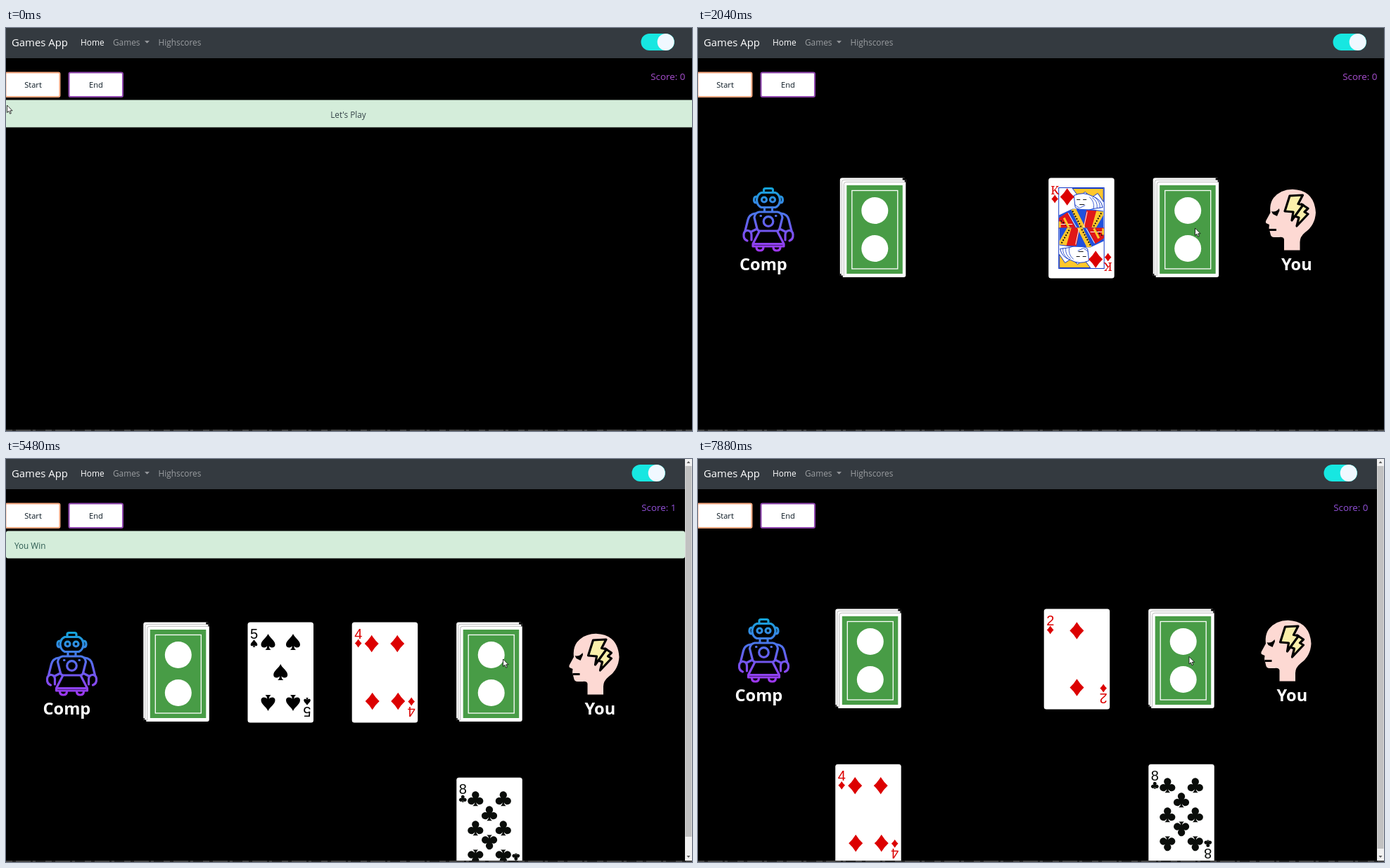
An HTML page that plays this animation: 975x574 px, repeating every 8 s.

```html
<!DOCTYPE html>
<html lang="en">
<head>
<meta charset="utf-8">
<title>Games App</title>
<style>
  html, body { margin: 0; width: 100%; height: 100%; overflow: hidden; background: #000; }
  svg { display: block; width: 975px; height: 574px; font-family: "Open Sans", "Noto Sans", sans-serif; }
  .nav { font-size: 11.85px; fill: #9a9da0; }
  .label { font-size: 23.6px; font-weight: 700; fill: #fff; }
  .msg { font-size: 11.75px; }
  .index { font: 20px "Liberation Sans", Arial, sans-serif; text-anchor: middle; }
  .index.face { font: 17px "Noto Serif", serif; }
</style>
</head>
<body>
<svg viewBox="0 0 975 574">
  <defs>
    <linearGradient id="robotInk" gradientUnits="userSpaceOnUse" x1="0" y1="227" x2="0" y2="319">
      <stop offset="0" stop-color="#12a5d8"/>
      <stop offset=".5" stop-color="#5a68ee"/>
      <stop offset="1" stop-color="#a035f0"/>
    </linearGradient>
    <path id="club" fill="#0a0d0a" d="M5.2-5.3A5.2 5.2 0 1 0-3.4-1.3A5.2 5.2 0 1 0-1 5.2Q-1.2 9-3.8 10.4H3.8Q1.2 9 1 5.2A5.2 5.2 0 1 0 3.4-1.3A5.2 5.2 0 0 0 5.2-5.3Z"/>
    <path id="spade" d="M0-11.5C2-6 10-2 10 4C10 9 4 9 1.2 6Q1.5 10 4 11.5H-4Q-1.5 10-1.2 6C-4 9-10 9-10 4C-10-2-2-6 0-11.5Z"/>
    <path id="diamond" fill="#dc0000" d="M0-12.3Q4.5-5 10 0Q4.5 5 0 12.3Q-4.5 5-10 0Q-4.5-5 0-12.3Z"/>
    <g id="deck">
      <rect width="93.5" height="141.5" rx="3" fill="#fff"/>
      <path d="M2.5 140V6Q2.5 2.8 6 2.8H92M5.5 140V9Q5.5 5.8 9 5.8H92" fill="none" stroke="#aaa" stroke-width=".8"/>
      <path d="M89 0H93.5V6H92V3H89ZM0 136.5H1.5V139H4V141.5H0Z"/>
      <rect x="9.5" y="10.5" width="79.5" height="126" fill="#489c46"/>
      <rect x="17" y="18" width="65" height="111.500" fill="none" stroke="#fff" stroke-width="1.3"/>
      <circle cx="49.500" cy="46.500" r="19" fill="#fff"/>
      <circle cx="49.500" cy="100.500" r="19" fill="#fff"/>
    </g>
    <g id="royalHalf">
      <path fill="#ffc72c" stroke="#1238c8" d="M34 15H78V34L70 22L61 28L52 20L43 27Z"/>
      <path fill="#fff" stroke="#1238c8" d="M36 25Q50 19 62 26Q75 30 77 42L63 44Q50 50 38 42Z"/>
      <path fill="none" stroke="#1238c8" stroke-width=".8" d="M62 28Q70 33 69 43M58 27Q66 34 64 44M66 28Q74 34 73 43M37 38L44 43L52 39"/>
      <path stroke="#111" d="M40 31H45M49 31H54M44 38H51"/>
      <path fill="#2050dc" d="M15 53L34 44L63 45L78 47V72H15Z"/>
      <path fill="#e01818" d="M15 57L27 49L39 72H15ZM54 46L71 47L61 72H49Z"/>
      <path fill="#ffc72c" d="M32 45L39 44L53 72H45ZM68 47L78 48V53L67 72H61Z"/>
      <path fill="none" stroke="#111" stroke-width="2" stroke-dasharray="2 2" d="M34 47L47 71M75 50L63 71M17 61L29 70"/>
      <path fill="none" stroke="#fff" d="M28 50L40 71M55 48L50 71M16 66H34"/>
      <path stroke="#ffc72c" stroke-width="3" d="M16 62V71M22 57L29 71"/>
    </g>
  </defs>

  <rect width="975" height="574"/>
  <rect width="975" height="43" fill="#343a40"/>
  <text x="8" y="26" font-size="14.9" fill="#fff">Games App</text>
  <g class="nav">
    <text x="106" y="25" fill="#fff">Home</text>
    <text x="152" y="25">Games</text>
    <path d="M197 18.200H204L200.500 21.700Z"/>
    <text x="216.500" y="25">Highscores</text>
  </g>
  <g id="corner">
    <rect x="902.500" y="8" width="47.500" height="24" rx="12" fill="#17e7e1"/>
    <circle cx="937.700" cy="20" r="12" fill="#f0f8ff"/>
    <text id="score" x="965.500" y="74" font-size="13.4" text-anchor="end"></text>
  </g>

  <rect data-on="1020-2040" x="-2" y="60.500" width="81" height="40" rx="4" fill="#0c2038"/>
  <rect id="start" x="-.5" y="63.500" width="77" height="34.500" rx="2" stroke="#f5a67e" stroke-width="2"/>
  <rect x="89.500" y="63.500" width="76.500" height="34.500" rx="2" fill="#fff" stroke="#8e44ad" stroke-width="2"/>
  <g font-size="11.1" text-anchor="middle">
    <text id="startText" x="38.500" y="85">Start</text>
    <text x="128" y="85" fill="#0c1a24">End</text>
  </g>

  <g class="msg">
    <g data-on="0-690">
      <rect y="102.500" width="975" height="39" fill="#d4edda"/>
      <text x="486.500" y="127.500" text-anchor="middle" fill="#36454a">Let's Play</text>
    </g>
    <g data-on="4100-6840">
      <rect y="102.500" width="965" height="39" rx="3" fill="#d4edda"/>
      <text x="12" y="127.500" fill="#2b5a50">You Win</text>
    </g>
    <g data-on="6840-7190">
      <rect y="102.500" width="965" height="39" rx="3" fill="#d1ecf1"/>
      <text x="12" y="127.500" fill="#40596a">You Lose</text>
    </g>
  </g>

  <g id="table" data-on="1020-8000">
    <g fill="none" stroke="url(#robotInk)" stroke-width="3.2" stroke-linejoin="round" stroke-linecap="round">
      <path d="M93.500 234V231Q93.500 228.500 96 228.500H104Q106.500 228.500 106.500 231V234M90 234.500H110Q116 237 116.500 245Q116 253 110 255.500H90Q84 253 83.500 245Q84 237 90 234.500ZM83 240Q79.500 240 79.500 245Q79.500 249 83 249M117 240Q120.500 240 120.500 245Q120.500 249 117 249"/>
      <circle cx="94" cy="244.500" r="3.500"/>
      <circle cx="106" cy="244.500" r="3.500"/>
      <path d="M94.500 257V261M105.500 257V261M87 262H113Q119 263 120 270L116 286Q115 289 112 289H88Q85 289 84 286L80 270Q81 263 87 262ZM89 267.500H89.500M110.500 267.500H111"/>
      <circle cx="100" cy="275.500" r="6.800"/>
      <path d="M82 264Q73 265 71 273L67 289M84 286L76 290M118 264Q127 265 129 273L133 289M116 286L124 290"/>
      <path d="M70 303Q64.500 301 65 294Q66 288 71 288.500Q76 289 76 295V302M130 303Q135.500 301 135 294Q134 288 129 288.500Q124 289 124 295V302"/>
      <path d="M87 290L78 307.500H122L113 290M78 307.500V311H122V307.500M83 312Q83 317 88 317Q93 317 93 312M107 312Q107 317 112 317Q117 317 117 312"/>
    </g>
    <g stroke-linejoin="round">
      <path fill="#fdd9d3" d="M855.500 316.500H833V301Q832 297 826 298H819Q814 298 813.500 293L811.500 285L812 280L807.500 278Q806 276 808 273L813.500 263Q812 250 818 242Q828 230 845 229.800Q876 231 878 263Q877 281 863 291Q855.500 297 855.500 305Z"/>
      <path d="M812 287.500H822" stroke="#000" stroke-width="3"/>
      <path d="M815 261Q821 263 826 257L826.500 260L823 268L817 265Z"/>
      <g fill="#fbefaa" stroke="#000" stroke-width="3.200">
        <path d="M858 251L867 257L862 262L867 265L851 282L854 270L848 268Z"/>
        <path d="M841 239L859.500 238L853 250.500L860 252L844 274L846 262L834 261Z"/>
      </g>
    </g>
    <text class="label" x="59" y="345">Comp</text>
    <text class="label" x="829" y="345">You</text>
    <use href="#deck" x="201.800" y="213.500"/>
    <use href="#deck" x="646.700" y="213.500"/>
    <g id="cards"></g>
  </g>

  <rect y="572" width="975" height="2" fill="#252525"/>
  <path d="M0 573H975" stroke="#666" stroke-dasharray="9 5 21 3 4 14"/>

  <g data-on="4100-8000">
    <rect x="965" width="10" height="572" fill="#f1f1f1"/>
    <rect id="thumb" x="965.500" y="10" width="9" fill="#c1c1c1"/>
    <path d="M967.500 6L970 3L972.500 6ZM967.500 565L970 568L972.500 565Z" fill="#606060"/>
  </g>

  <g id="cursor">
    <g data-on="4820-5130" fill="none">
      <circle r="9" stroke="#000"/>
      <circle r="8" stroke="#fff"/>
    </g>
    <path d="M0 0V10.500L2.400 8.300L4.100 12.200L5.800 11.500L4.200 7.800H7.600Z" fill="#fff" stroke="#000" stroke-width=".8"/>
  </g>
</svg>

<script>
const LOOP = 8000;
const $ = id => document.getElementById(id);

const use = (name, transform) => `<use href="#${name}" transform="${transform}"/>`;

// Every card is one half plus the same half turned upside down, with optional middle pips.
function card({ rank, suit, pips, middle = [], color, on, x, y }) {
  const place = ([px, py]) => use(suit, `translate(${px} ${py})`);
  const royal = rank === 'K';
  const half =
    (royal ? use('royalHalf', '') : '') +
    `<text class="index${royal ? ' face' : ''}" x="9" y="23" fill="${color}">${rank}</text>` +
    use(suit, 'translate(9 30) scale(.48)') + pips.map(place).join('');
  const frame = royal
    ? '<rect x="14.500" y="14" width="64.500" height="115" fill="none" stroke="#1238c8"/>' : '';
  return `<g data-on="${on}" transform="translate(${x} ${y})">
    <rect width="93.500" height="143" rx="3.500" fill="#fff"/>
    ${frame}${half}<g transform="rotate(180 46.750 71.500)">${half}</g>
    ${middle.map(place).join('')}</g>`;
}

const red = '#dc0000', black = '#0a0d0a';
const king = { rank: 'K', suit: 'diamond', color: red, pips: [[26.5, 27]] };
const eight = { rank: 8, suit: 'club', color: black, pips: [[27, 30], [66.5, 30], [46.7, 51]], middle: [[27, 72], [66.5, 72]] };
const five = { rank: 5, suit: 'spade', color: '#000', pips: [[29, 28], [64.5, 28]], middle: [[46.7, 71]] };
const four = { rank: 4, suit: 'diamond', color: red, pips: [[28, 30.5], [64.5, 30.5]] };
const two = { rank: 2, suit: 'diamond', color: red, pips: [[46.7, 31]] };

const compSlot = { x: 350, y: 213.5 }, youSlot = { x: 498.2, y: 213.5 };
const compPile = { x: 201.7, y: 434.8 }, youPile = { x: 646.8, y: 434.8 };

$('cards').innerHTML = [
  { ...king, ...youSlot, on: '2040-4100' },
  { ...eight, ...compSlot, on: '2740-4100' },
  { ...eight, ...youPile, on: '4100-8000' },
  { ...four, ...youSlot, on: '5130-6840' },
  { ...five, ...compSlot, on: '5480-6840' },
  { ...four, ...compPile, on: '6840-8000' },
  { ...two, ...youSlot, on: '7880-8000' },
].map(card).join('');

const timed = [...document.querySelectorAll('[data-on]')].map(el => {
  const [from, to] = el.dataset.on.split('-').map(Number);
  return { el, from, to };
});

// Each step is [start time, value]; the latest started one applies.
const stepAt = (steps, t) => steps.findLast(([start]) => start <= t)[1];

const cursorSteps = [
  [0, [1.5, 110]], [330, [56, 83]], [1020, [413, 213.5]], [1360, [690.5, 251]],
  [1710, [706.5, 285]], [7520, [704.5, 285]], [7880, [698, 281.5]],
];
const hoverSteps = [[0, 0], [330, .6], [690, 1], [1020, .34], [1360, 0]];
const scoreSteps = [[0, 0], [4100, 1], [6840, 0]];
const mix = (a, b, k) => `rgb(${a.map((v, i) => Math.round(v + (b[i] - v) * k))})`;

function draw(t) {
  for (const { el, from, to } of timed) {
    el.style.display = t >= from && t < to ? '' : 'none';
  }
  const scrolling = t >= 4100;
  const alertOpen = scrolling && t < 7190;
  $('table').setAttribute('transform', `translate(${scrolling ? -6.5 : 0} ${alertOpen ? 19 : 0})`);
  $('corner').setAttribute('transform', `translate(${scrolling ? -13 : 0} 0)`);
  $('thumb').setAttribute('height', alertOpen ? 528 : 545);
  $('score').textContent = `Score: ${stepAt(scoreSteps, t)}`;
  $('score').setAttribute('fill', scrolling ? '#9250d8' : '#a84fd0');

  const hover = stepAt(hoverSteps, t);
  $('start').setAttribute('fill', mix([255, 255, 255], [255, 164, 124], hover));
  $('startText').setAttribute('fill', mix([12, 26, 36], [255, 255, 255], Math.min(1, hover * 1.2)));
  $('cursor').setAttribute('transform', `translate(${stepAt(cursorSteps, t)})`);
}

function tick() {
  draw(performance.now() % LOOP);
  requestAnimationFrame(tick);
}
tick();
</script>
</body>
</html>
```
